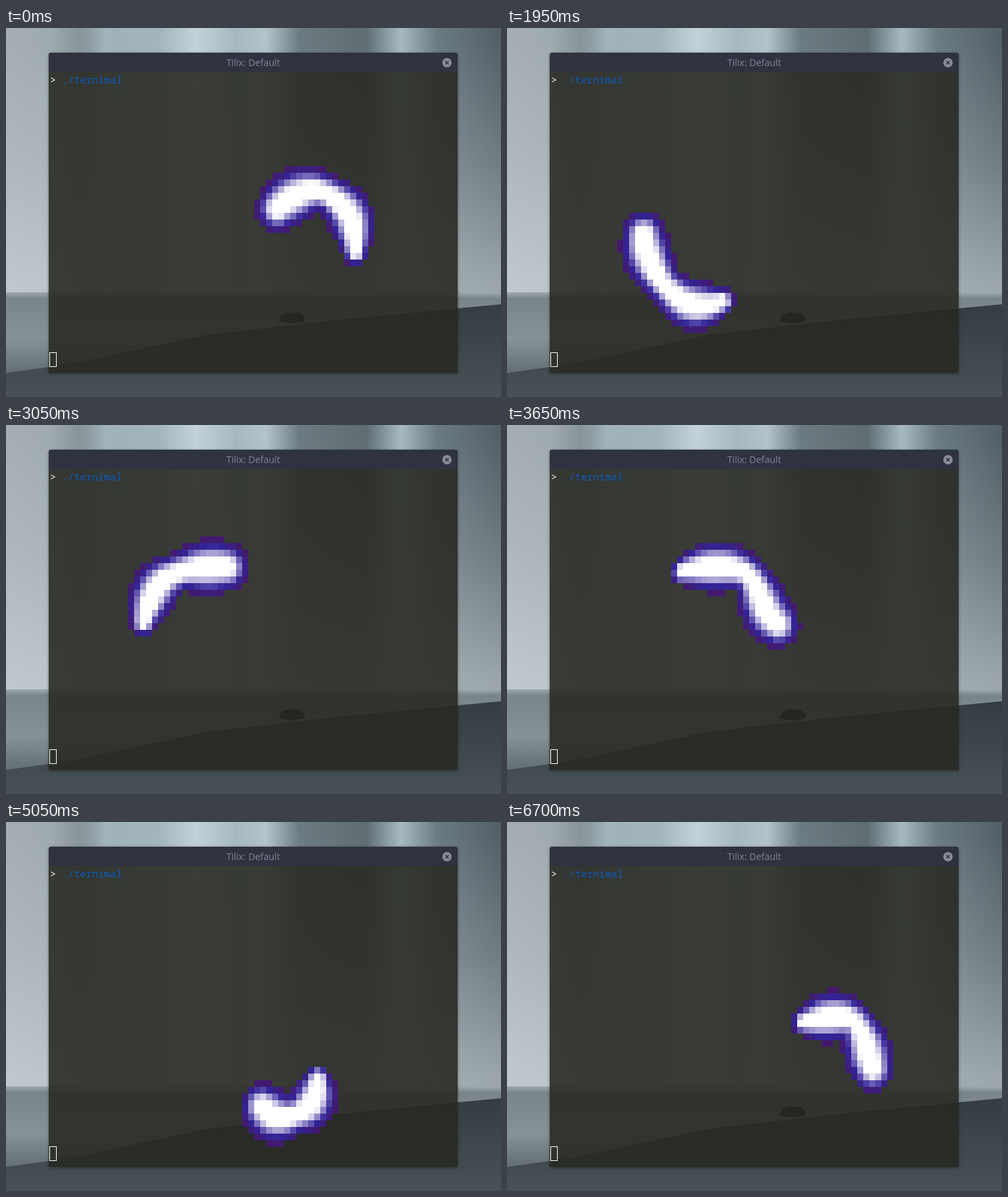
An HTML page with a canvas for the animation above (6.75 s loop, 742 by 553 pixels).

```html
<!DOCTYPE html>
<html lang="en">
<head>
<meta charset="utf-8">
<title>Terminal creature</title>
<style>
  html, body { margin: 0; width: 100%; height: 100%; overflow: hidden; background: #5b666b; }
  #stage { position: relative; width: 742px; height: 553px; overflow: hidden; }
  #stage > * { position: absolute; }
  .sky {
    inset: 0;
    background:
      linear-gradient(90deg, rgba(212, 221, 225, .62), rgba(212, 221, 225, .55) 9%, transparent 22%),
      linear-gradient(rgba(180, 190, 195, 0) 20px, rgba(180, 190, 195, .3) 200px, rgba(180, 190, 195, .75) 385px),
      linear-gradient(90deg, #566267, #67757b 110px, #9eb1b8 150px, #a3b5bc 230px, #c3d2d8 285px,
        #a6b8bf 345px, #b3c3c9 390px, #6c7b81 440px, #5f6d73 540px, #a6b9c1 592px, #6c7b82 645px, #535f66);
  }
  .land { left: 0; top: 0; }
  .window, .shade { left: 64px; top: 37px; width: 613px; height: 480px; border-radius: 4px 4px 0 0; }
  .window { overflow: hidden; background: rgba(39, 40, 33, .88); }
  .shade { box-shadow: 0 1px 4px rgba(0, 0, 0, .4); }
  .bar {
    height: 29px; background: #2f323f; color: #80859a;
    font: 14px/29px "Open Sans", "Noto Sans", sans-serif; text-align: center;
  }
  .close { left: 653px; top: 44px; }
  .prompt {
    left: 66px; top: 67px; color: #0b5bc4; white-space: pre;
    font: 15px/20px "Noto Sans Mono", "DejaVu Sans Mono", monospace;
  }
  .prompt span { color: #fff; }
  .cursor { left: 65px; top: 486px; width: 9px; height: 20px; border: 1px solid #fff; }
  canvas { left: 0; top: 0; }
</style>
</head>
<body>
<div id="stage">
  <div class="sky"></div>
  <svg class="land" width="742" height="553">
    <defs>
      <linearGradient id="sea" x2="0" y2="1">
        <stop offset="0" stop-color="#a0abaf"/>
        <stop offset=".06" stop-color="#7a8589"/>
        <stop offset=".45" stop-color="#869297"/>
        <stop offset="1" stop-color="#4a5459"/>
      </linearGradient>
      <linearGradient id="beach" x2="0" y2="1">
        <stop offset="0" stop-color="#343d42"/>
        <stop offset="1" stop-color="#475156"/>
      </linearGradient>
    </defs>
    <rect y="396" width="742" height="157" fill="url(#sea)"/>
    <path d="M0 517 L100 503 L300 460 L500 437 L742 414 V553 H0 Z" fill="url(#beach)"/>
    <path d="M409 440 L412 430 L422 426 L441 427 L448 434 L447 440 L430 443 Z" fill="#13181b"/>
  </svg>
  <div class="shade"></div>
  <div class="window"><div class="bar">Tilix: Default</div></div>
  <svg class="close" width="16" height="16">
    <circle cx="8" cy="8" r="7" fill="#8a8d98"/>
    <path d="M5.5 5.5 L10.5 10.5 M10.5 5.5 L5.5 10.5" stroke="#2f323f" stroke-width="1.6"/>
  </svg>
  <div class="prompt"><span>&gt;</span> ./ternimal</div>
  <div class="cursor"></div>
  <canvas id="view" width="742" height="553"></canvas>
</div>
<script>
  const LOOP = 6750, STEP = 50;
  const LEFT = 66, TOP = 67, CELL_W = 9, CELL_H = 10, COLS = 68, ROWS = 45;
  const SAMPLES = 60;
  const RIM = [70, 24, 98], INDIGO = [50, 36, 152], WHITE = [255, 255, 255];

  // Points the head passes at equal intervals
  const ROUTE_START = -1000, ROUTE_GAP = 350;
  const route = [
    [524, 335], [513, 277], [462, 243], [401, 277], [391, 338], [366, 389], [289, 416], [239, 388],
    [208, 331], [209, 283], [236, 233], [292, 214], [358, 222], [394, 286], [437, 322], [466, 368],
    [455, 425], [400, 440], [354, 374], [380, 325], [453, 298], [519, 298], [548, 369]
  ];
  const point = i => route[Math.min(route.length - 1, Math.max(0, i))];

  // Catmull-Rom curve through the route
  function headAt(t) {
    const k = (t - ROUTE_START) / ROUTE_GAP, i = Math.floor(k), u = k - i;
    const [a, b, c, d] = [-1, 0, 1, 2].map(n => point(i + n));
    return [0, 1].map(n => b[n] + u / 2 * (c[n] - a[n]
      + u * (2 * a[n] - 5 * b[n] + 4 * c[n] - d[n] + u * (3 * (b[n] - c[n]) + d[n] - a[n]))));
  }

  // Time covered by the body, shortest near the end of the loop
  const span = t => 1000 - 400 * Math.exp(-(((t - 5800) / 1400) ** 2));

  // Radius in cells: two bulges and a tapered tail, q runs from head to tail
  const girth = q => 3.9 + .6 * Math.cos(2 * Math.PI * (q - .15) / .59) - q ** 4;

  const mix = (a, b, u) => a.map((v, n) => Math.round(v + (b[n] - v) * Math.min(1, u)));
  const glow = level => level < .3 ? mix(RIM, INDIGO, level / .3) : mix(INDIGO, WHITE, (level - .3) / .4);

  function body(t) {
    const nodes = [];
    let length = 0;
    for (let n = 0; n <= SAMPLES; n++) {
      const [px, py] = headAt(t - span(t) * n / SAMPLES);
      const x = (px - LEFT) / CELL_W, y = (py - TOP) / CELL_H;
      if (n) length += Math.hypot(x - nodes[n - 1].x, y - nodes[n - 1].y);
      nodes.push({ x, y, length });
    }
    for (const node of nodes) node.r = girth(node.length / length);
    return nodes;
  }

  const ctx = document.getElementById("view").getContext("2d");

  function draw(t) {
    ctx.clearRect(0, 0, 742, 553);
    const nodes = body(t);
    for (let row = 0; row < ROWS; row++) {
      for (let col = 0; col < COLS; col++) {
        const level = Math.max(...nodes.map(({ x, y, r }) => 1 - Math.hypot(col + .5 - x, row + .5 - y) / r));
        if (level < .04) continue;
        ctx.fillStyle = `rgb(${glow(level)})`;
        ctx.fillRect(LEFT + col * CELL_W, TOP + row * CELL_H, CELL_W, CELL_H);
      }
    }
  }

  const start = performance.now();
  let shown = -1;
  function tick() {
    const t = Math.floor((performance.now() - start) % LOOP / STEP) * STEP;
    if (t !== shown) draw(shown = t);
    requestAnimationFrame(tick);
  }
  tick();
</script>
</body>
</html>
```
